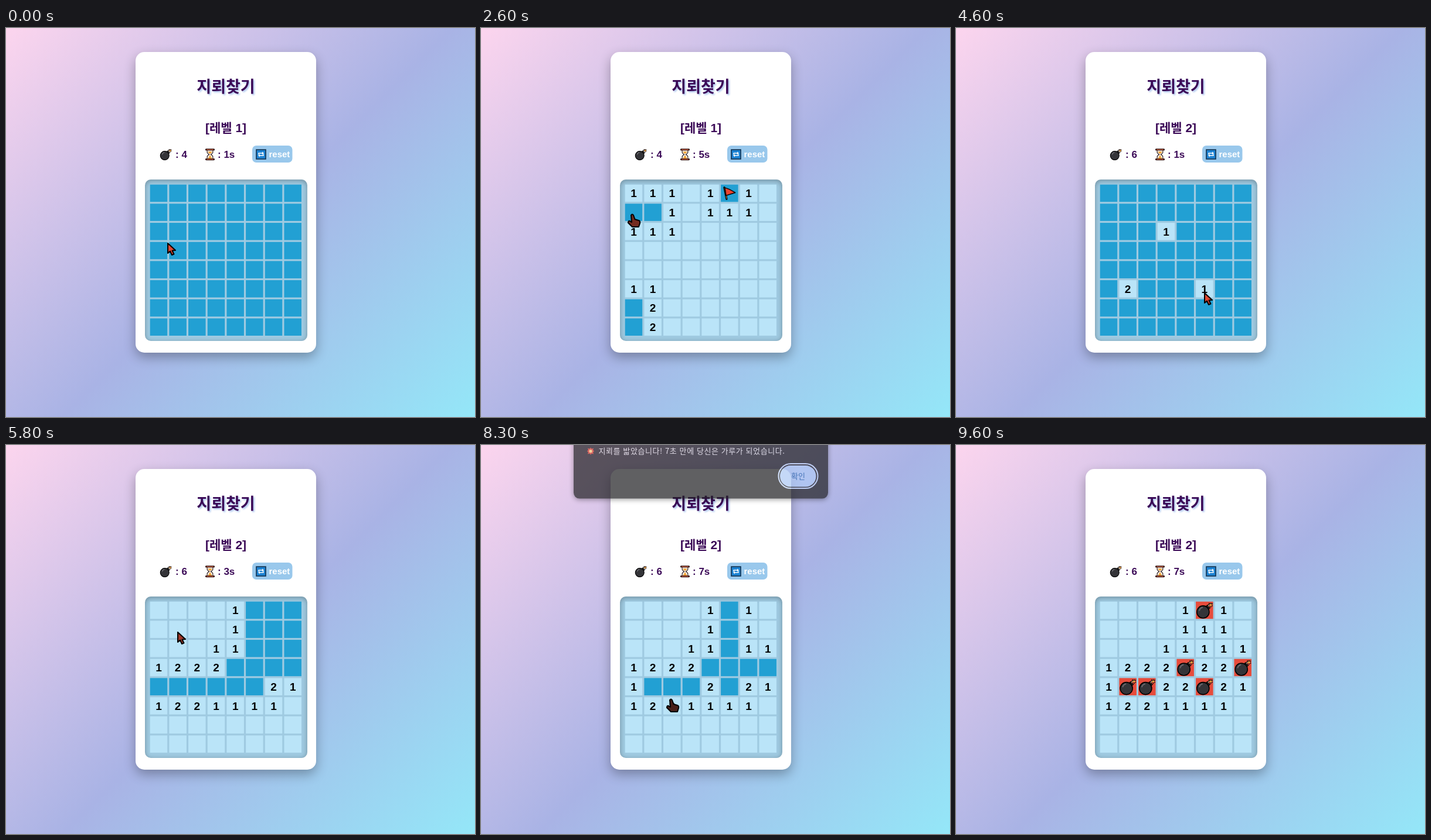
These frames come from a looping animation (800 px wide and 665 px high, 9.9 s). An HTML page:

```html
<!DOCTYPE html>
<html lang="ko">
<head>
<meta charset="utf-8">
<title>지뢰찾기</title>
<style>
  html, body { margin: 0; width: 100%; height: 100%; overflow: hidden; }
  body { position: relative; background: linear-gradient(135deg, #fcd5ee 0%, #a9b3e5 52%, #94e7f8 100%); }
  #card, #board, svg.stage { position: absolute; box-sizing: border-box; }
  #card { left: 221px; top: 41px; width: 308px; height: 513.5px; border-radius: 15px;
    background: #fff; box-shadow: 0 8px 20px rgba(0, 0, 0, .3); }
  #board { left: 236.5px; top: 258.5px; width: 277px; height: 276.5px; border-radius: 10px;
    background: #9fcae1; box-shadow: inset 0 2px 8px rgba(0, 0, 0, .3); }
  svg.stage { left: 0; top: 0; width: 800px; height: 665px; }
  text { font: bold 17px "Liberation Sans", "Noto Sans CJK KR", "Noto Sans CJK", sans-serif; fill: #3b0a57; }
  #title { font: bold 27px "Noto Sans CJK KR", "Noto Sans CJK", sans-serif; text-shadow: 2px 2px 3px #a9c4ee; }
  #level { font-size: 21px; }
  #cells text { font-size: 19px; fill: #000; }
  #dialog text { font: 13px "Noto Sans CJK KR", "Noto Sans CJK", sans-serif; fill: #e4e4e6; letter-spacing: .58px; }
  #panel { filter: drop-shadow(0 2px 4px rgba(0, 0, 0, .5)); }
  .mid { text-anchor: middle; }
</style>
</head>
<body>
<div id="card"></div>
<div id="board"></div>
<svg class="stage" viewBox="0 0 800 665">
  <defs>
    <symbol id="bomb" viewBox="0 0 30 30">
      <path d="M16 9l4-3 5 5-4 4z" fill="#222" stroke="#000"/>
      <circle cx="12.5" cy="18" r="10.7" fill="#343438" stroke="#000" stroke-width="1.6"/>
      <path d="M6 16q1-5 6-6" fill="none" stroke="#66666c" stroke-width="2"/>
      <path d="M21 9q1-5 5-3" fill="none" stroke="#000" stroke-width="3"/>
      <path d="M21.5 8.5q1-4 4-2.500" fill="none" stroke="#d9b08a" stroke-width="1.4"/>
      <path d="M26 2v3M22.500 2.500l2 2M29 3l-2 2M29 8l-2-2M26 10V7" stroke="#2a1710" stroke-width="1.6"/>
      <circle cx="26" cy="6" r="1.800" fill="#f2a33c"/>
    </symbol>
    <symbol id="flag" viewBox="0 0 30 30">
      <path d="M6 5l4 20" stroke="#000" stroke-width="3.4" stroke-linecap="round"/>
      <path d="M6.500 5.500l3.500 19" stroke="#b0793f" stroke-width="1.2"/>
      <path d="M7 5.500q6 1 18 8.500l-16 5z" fill="#e8432f" stroke="#000" stroke-width="1.5" stroke-linejoin="round"/>
    </symbol>
    <symbol id="hourglass" viewBox="0 0 16 22">
      <path d="M3 3v4q0 2 3.500 4-3.500 2-3.500 4v4h10v-4q0-2-3.500-4 3.500-2 3.500-4V3z" fill="#f3eee8" stroke="#332222" stroke-width="1.200"/>
      <path d="M4.500 6h7q0 2-3.500 4-3.500-2-3.500-4zM8 12l3.800 6.500H4.200z" fill="#f2a63a"/>
      <path d="M1.500 2.500h13M1.500 19.500h13" stroke="#2b1111" stroke-width="3.4" stroke-linecap="round"/>
      <path d="M2 2.500h12M2 19.500h12" stroke="#b8573d" stroke-width="1.4"/>
    </symbol>
    <symbol id="repeat" viewBox="0 0 18 18">
      <rect x="1" y="1" width="16" height="16" fill="#1d82d2" stroke="#12314f" stroke-width="1.600"/>
      <path d="M5 9.500V7h7M13 8.500V11H6" fill="none" stroke="#fff" stroke-width="1.400"/>
      <path d="M11 4.500L14 7l-3 2.500zM7 8.500L4 11l3 2.500z" fill="#fff"/>
    </symbol>
    <symbol id="party" viewBox="0 0 14 14">
      <path d="M1 13L4 5l5 5z" fill="#f0b43c"/>
      <path d="M6 5q2-1 1-4M9 8q2-2 4-1M8 6l3-3" fill="none" stroke="#e8925c" stroke-width="1.400"/>
      <path d="M10 1h1.500M12 4h1.500M11 11h1.500M3 2h1.500" stroke="#7db7ee" stroke-width="1.500"/>
    </symbol>
    <symbol id="blast" viewBox="0 0 14 14">
      <path d="M2 2l3 1 2-2 2 2 3-1-1 3 2 2-2 2 1 3-3-1-2 2-2-2-3 1 1-3-2-2 2-2z" fill="#d8412f"/>
      <circle cx="7" cy="7" r="2.600" fill="#f7d27a"/>
    </symbol>
  </defs>

  <text id="title" class="mid" x="375" y="109.500">지뢰찾기</text>
  <text id="level" class="mid" x="375" y="177.500"></text>
  <use href="#bomb" x="262" y="205.500" width="21" height="21"/>
  <text id="mines" x="289" y="222"></text>
  <use href="#hourglass" x="340" y="205.500" width="16" height="21.500"/>
  <text id="timer" x="361" y="222"></text>
  <rect x="420" y="201" width="68.500" height="29" rx="7" fill="#99c8ec"/>
  <use href="#repeat" x="426" y="207" width="18" height="18"/>
  <text x="448.500" y="221" style="font-size:15px;fill:#fff">reset</text>

  <g id="cells"></g>

  <g id="dialog">
    <rect id="panel" x="158" y="-60" width="434" height="155" rx="10" fill="#212124"/>
    <use id="icon" x="180" y="7" width="14" height="14"/>
    <text id="message" x="200.500" y="18"></text>
    <rect id="ring" x="507.500" y="35.500" width="67" height="42" rx="21" fill="none" stroke="#c3d8fb" stroke-width="2"/>
    <rect x="510" y="38.500" width="61.500" height="36.500" rx="18" fill="#adc9f5"/>
    <text class="mid" x="541" y="61.500" style="fill:#1a5aa8;letter-spacing:0">확인</text>
  </g>

  <path id="cursor" stroke-linejoin="round"/>
</svg>

<script>
const LOOP = 9900, STEP = 100, SIZE = 8, PITCH = 32.68, CELL = 29.5, LEFT = 245.7, TOP = 267.7;
const ARROW = 'M0 0V17L4 13.500L7 20L10.500 18.500L7.500 12.500L13 12Z';
const HAND = 'M-3 2Q-1-1 1 2L3.500 9L10 11Q13 12 12 16L10 22H-1L-8 15Q-8 11-5 12L-2 14Z';

// Mines: [row, column]; clicks: [time, row, column].
const levels = [
  { mines: [[0, 5], [1, 1], [6, 0], [7, 0]],
    clicks: [[600, 3, 1], [2000, 0, 1], [2300, 0, 0]], flag: [1500, 0, 5],
    seconds: t => Math.min(5, 2 + Math.floor((t - 500) / 600)),
    dialog: { open: 2800, press: 3400, icon: 'party', text: '레벨 1 클리어! 5초 소요됨. 다음 레벨로 이동합니다.' } },
  { mines: [[0, 5], [3, 4], [3, 7], [4, 1], [4, 2], [4, 5]],
    clicks: [[4200, 2, 3], [4400, 5, 1], [4500, 5, 5], [4900, 7, 6], [5700, 1, 1],
      [6800, 0, 7], [7400, 4, 4], [7700, 4, 0]], revealAt: 9300,
    seconds: t => Math.max(0, Math.min(7, 1 + Math.floor((t - 4200) / 600))),
    dialog: { open: 8100, press: 9200, icon: 'blast', text: '지뢰를 밟았습니다! 7초 만에 당신은 가루가 되었습니다.' } }
];
const SECOND_LEVEL = 3400, CURSOR_GONE = 9500;

// Cursor stops: time, x, y.
const path = [
  [0, 276, 368], [300, 276, 368], [600, 296, 382], [1400, 424, 290], [1600, 424, 290],
  [2000, 294, 286], [2300, 262, 286], [2600, 259, 318], [2800, 259, 318], [3300, 545, 69],
  [3600, 545, 69], [4200, 358, 356], [4400, 293, 452], [4600, 424, 453], [4900, 456, 515],
  [5100, 456, 515], [5700, 293, 320], [6000, 293, 320], [6700, 488, 288], [6900, 494.5, 276],
  [7400, 391, 418], [7700, 261, 418], [8000, 325, 422], [8200, 325, 434], [8500, 325, 434],
  [9000, 545, 66], [9500, 545, 66]
];

const $ = id => document.getElementById(id);
const clamp = v => Math.max(0, Math.min(1, v));
const key = (r, c) => r * SIZE + c;

function around(r, c) {
  const list = [];
  for (let y = Math.max(0, r - 1); y <= Math.min(SIZE - 1, r + 1); y++)
    for (let x = Math.max(0, c - 1); x <= Math.min(SIZE - 1, c + 1); x++) list.push([y, x]);
  return list;
}

const isMine = (level, r, c) => level.mines.some(m => m[0] === r && m[1] === c);
const count = (level, r, c) => around(r, c).filter(n => isMine(level, ...n)).length;

function reveal(level, open, r, c) {
  if (open.has(key(r, c))) return;
  open.add(key(r, c));
  if (!count(level, r, c)) around(r, c).forEach(n => reveal(level, open, ...n));
}

function openCells(level, t) {
  const open = new Set();
  for (const [at, r, c] of level.clicks) if (t >= at) reveal(level, open, r, c);
  if (t >= level.revealAt) for (let i = 0; i < SIZE * SIZE; i++) open.add(i);
  return open;
}

function drawCells(level, open, t) {
  let out = '';
  for (let r = 0; r < SIZE; r++) for (let c = 0; c < SIZE; c++) {
    const x = LEFT + c * PITCH, y = TOP + r * PITCH;
    const shown = open.has(key(r, c)), mine = isMine(level, r, c);
    const flagged = level.flag && t >= level.flag[0] && r === level.flag[1] && c === level.flag[2];
    const fill = !shown ? '#22a0d3' : mine ? '#e74c3c' : '#bae4f8';
    const icon = shown && mine ? 'bomb' : flagged && 'flag';
    const n = shown && !mine && count(level, r, c);
    out += `<rect x="${x}" y="${y}" width="${CELL}" height="${CELL}" fill="${fill}"/>`;
    if (icon) out += `<use href="#${icon}" x="${x}" y="${y}" width="${CELL}" height="${CELL}"/>`;
    if (n) out += `<text class="mid" x="${x + CELL / 2}" y="${y + 21.6}">${n}</text>`;
  }
  $('cells').innerHTML = out;
}

function drawDialog(t) {
  const d = levels[t < 5000 ? 0 : 1].dialog;
  const shown = Math.min(clamp((t - d.open) / 280), 1 - clamp((t - d.press - 50) / 200));
  $('dialog').setAttribute('opacity', shown);
  $('dialog').setAttribute('transform', `translate(0 ${-12 * (1 - shown)})`);
  $('icon').setAttribute('href', '#' + d.icon);
  $('message').textContent = d.text;
  $('ring').setAttribute('opacity', t < d.press ? 1 : 0);
  return shown > 0;
}

function cursorAt(t) {
  const i = path.findIndex(p => p[0] > t);
  if (i < 0) return path[path.length - 1].slice(1);
  const [t0, x0, y0] = path[i - 1], [t1, x1, y1] = path[i];
  const p = (t - t0) / (t1 - t0), e = p * p * (3 - 2 * p);
  return [x0 + (x1 - x0) * e, y0 + (y1 - y0) * e];
}

function overClosedCell(open, x, y) {
  const u = x - LEFT, v = y - 8 - TOP, c = Math.floor(u / PITCH), r = Math.floor(v / PITCH);
  return r >= 0 && c >= 0 && r < SIZE && c < SIZE &&
    u % PITCH < CELL && v % PITCH < CELL && !open.has(key(r, c));
}

function drawCursor(t, open, dialogOpen) {
  const [x, y] = cursorAt(t), cursor = $('cursor');
  const plain = dialogOpen && y < 96;
  const glow = (1 + Math.cos(2 * Math.PI * t / 1533)) / 2;
  const red = `rgb(${60 + 165 * glow}, ${28 + 44 * glow}, ${22 + 28 * glow})`;
  cursor.setAttribute('d', !plain && overClosedCell(open, x, y) ? HAND : ARROW);
  cursor.setAttribute('transform', `translate(${x} ${y})${plain ? ' scale(.9)' : ''}`);
  cursor.setAttribute('fill', plain ? '#000' : red);
  cursor.setAttribute('stroke', plain ? '#fff' : '#000');
  cursor.setAttribute('stroke-width', plain ? 1 : 2);
  cursor.setAttribute('visibility', t < CURSOR_GONE ? 'visible' : 'hidden');
}

function draw(t) {
  const index = t < SECOND_LEVEL ? 0 : 1, level = levels[index], open = openCells(level, t);
  $('level').textContent = `[레벨 ${index + 1}]`;
  $('mines').textContent = `: ${level.mines.length}`;
  $('timer').textContent = `: ${level.seconds(t)}s`;
  drawCells(level, open, t);
  drawCursor(t, open, drawDialog(t));
}

let last = -1;
function tick() {
  const t = Math.floor(performance.now() % LOOP / STEP) * STEP;
  if (t !== last) draw(last = t);
  requestAnimationFrame(tick);
}
tick();
</script>
</body>
</html>
```
